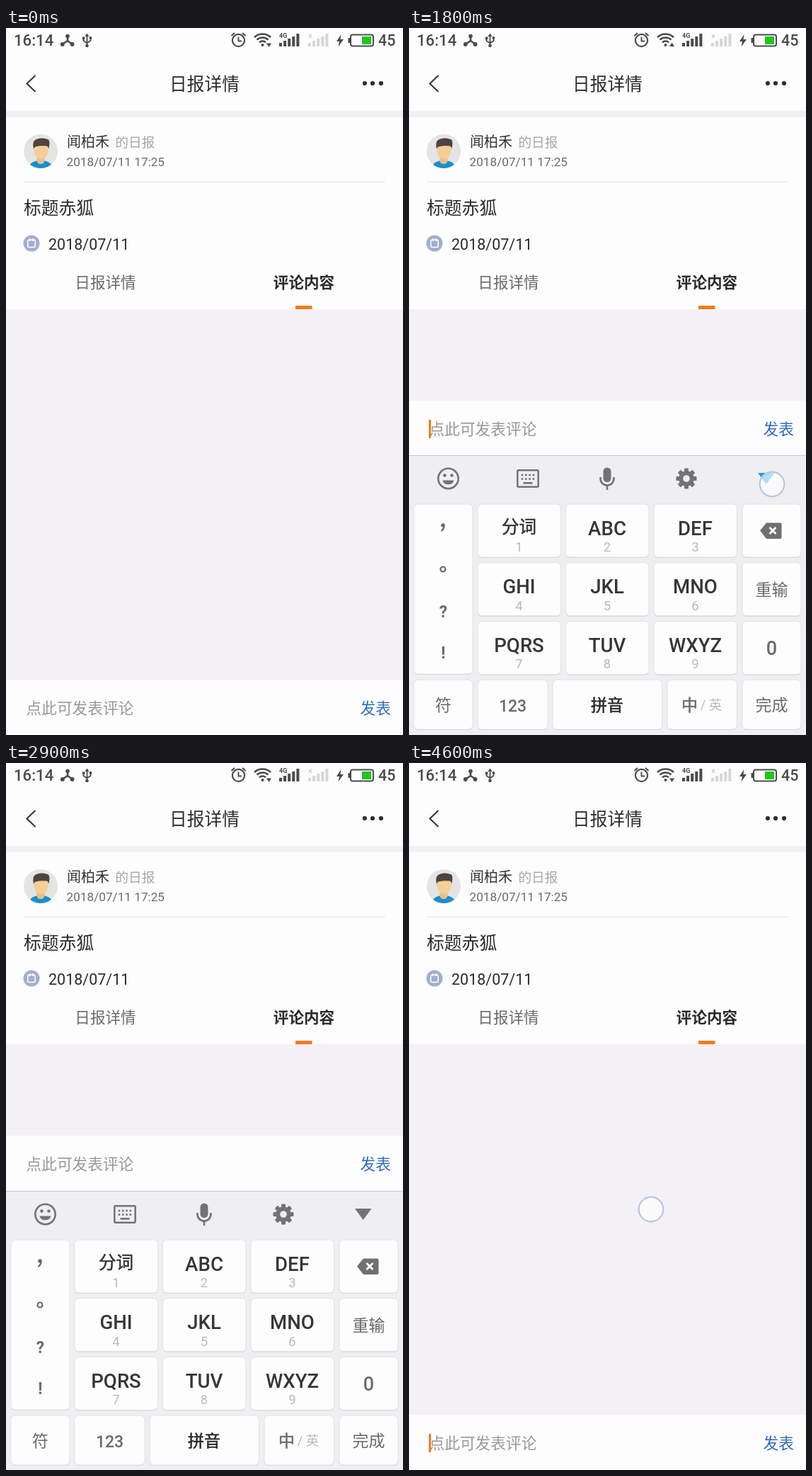
An HTML page that plays this animation: 561 by 998 pixels, repeating every 4700 ms.

```html
<!DOCTYPE html>
<html lang="zh-CN">
<head>
<meta charset="utf-8">
<style>
html, body { margin: 0; width: 100%; height: 100%; overflow: hidden; background: #fefdfe; }
svg { display: block; width: 561px; height: 998px; }
text { font-family: Roboto, "Noto Sans CJK SC", "Noto Sans CJK", sans-serif; white-space: pre; }
.medium { stroke: currentColor; stroke-width: .6px; }
</style>
</head>
<body>
<svg id="stage" viewBox="0 0 561 998" xmlns="http://www.w3.org/2000/svg"></svg>
<script>
const LOOP = 4700, STEP = 100, TRAVEL = 394;
const INK = '#2b2b2b', GREY = '#6a6a6c', PALE = '#b9b9bc', ORANGE = '#ee7c1c', WHITE = '#fefdfe';

const text = (x, y, size, fill, str, anchor = 'start', weight = 400) =>
  `<text x="${x}" y="${y}" font-size="${size}" fill="${fill}" text-anchor="${anchor}" font-weight="${weight}">${str}</text>`;
const mid = (x, y, size, fill, str, weight) => text(x, y, size, fill, str, 'middle', weight);
// Han glyphs have no medium weight here, so thicken the regular one
const medium = (x, y, size, fill, str) =>
  `<g class="medium" color="${fill}">${mid(x, y, size, fill, str)}</g>`;
const rect = (x, y, w, h, fill, extra = '') =>
  `<rect x="${x}" y="${y}" width="${w}" height="${h}" fill="${fill}" ${extra}/>`;
const dot = (x, y, r, fill, extra = '') => `<circle cx="${x}" cy="${y}" r="${r}" fill="${fill}" ${extra}/>`;
const line = (d, stroke, w, extra = '') =>
  `<path d="${d}" fill="none" stroke="${stroke}" stroke-width="${w}" ${extra}/>`;
const fill = (d, color, extra = '') => `<path d="${d}" fill="${color}" ${extra}/>`;

const bars = (x, color) => [5, 8, 11, 14, 18]
  .map((h, i) => rect(x + i * 6.1, 26 - h, 4, h, color)).join('');

function statusBar() {
  const c = '#4a4a4c';
  const wave = r => line(`M${362.5 - r * .7} ${25 - r * .72}A${r} ${r} 0 0 1 ${362.5 + r * .7} ${25 - r * .72}`, c, 2.5);
  return text(11, 25, 22.2, c, '16:14', 'start', 500)
    + line('M87 11V18L79.5 23M87 18L94 23', c, 2.6)
    + dot(87, 11.5, 2.8, c) + dot(79.8, 23, 2.9, c) + dot(93.6, 23, 2.9, c)
    + line('M114.5 10V25M109.5 14V18L114.5 21.5L119.5 18V14', c, 1.8)
    + fill('M111.5 12L114.5 7.5L117.5 12Z', c) + dot(114.5, 25, 2.3, c)
    + rect(107.8, 12.5, 3.6, 3.6, c) + dot(119.5, 14, 2, c)
    + dot(328.5, 17.5, 8.6, 'none', `stroke="${c}" stroke-width="2.2"`)
    + line('M328.5 12.5V18.5H333', c, 1.9) + line('M318.5 11L323 7M334 7L338.5 11', c, 2.2)
    + wave(16.5) + wave(11.5) + wave(6.5) + dot(362.5, 24, 2, c)
    + `<g id="traffic"></g>`
    + bars(386, c) + rect(385, 7, 13, 8, WHITE) + text(386, 14, 9, c, '4G', 'start', 700)
    + bars(427, '#d6d6d8') + line('M428 9L432 14M432 9L428 14', '#bdbdc0', 1.1)
    + fill('M473.5 9L467 19H471L469.5 26.5L477 16H472.5Z', c)
    + rect(487, 9.5, 32, 16, 'none', `rx="3" stroke="${c}" stroke-width="2"`)
    + rect(483.5, 14, 3, 7, c) + rect(503, 12, 13, 11, '#1fc71f')
    + text(526, 25, 21.5, c, '45', 'start', 500);
}

function avatar() {
  return `<clipPath id="face"><circle cx="49" cy="174" r="24"/></clipPath><g clip-path="url(#face)">`
    + rect(25, 150, 48, 48, '#e4e4e6')
    + fill('M32 199Q32 190 43 187.5H55Q66 190 66 199Z', '#1b8ecb')
    + fill('M43.5 178H54.5V187Q54 192 49 192Q44 192 43.5 187Z', '#e9c086')
    + fill('M39.5 164H59.5V174Q58 184 49.5 185Q41 184 39.5 174Z', '#f2cf95')
    + fill('M39 171Q36.5 160 42 157.5Q50 153.5 60 157.5Q63 162 60 171Q60 167 57.5 166.5Q49 165.5 42 167.5Q39.5 168 39 171Z', '#50423d')
    + '</g>';
}

function page() {
  return rect(0, 0, 561, 998, WHITE) + statusBar()
    + line('M41.5 67L29.5 78.5L41.5 90', '#333', 2)
    + mid(280.5, 88, 24.7, INK, '日报详情')
    + [507, 518, 530].map(x => dot(x, 78, 3.1, '#2d2d2d')).join('')
    + rect(0, 117, 561, 9, '#f1f0f3')
    + avatar()
    + text(86, 168, 20, '#333', '闻柏禾') + text(154.5, 168, 18.6, '#a6a6a8', '的日报')
    + text(85.5, 195, 17.2, GREY, '2018/07/11 17:25')
    + rect(25, 216.5, 511, 1.5, '#ebebed')
    + text(25, 263, 24.8, INK, '标题赤狐')
    + dot(36, 304, 11.5, '#a0b0cc')
    + rect(30.8, 299, 10.4, 10.4, 'none', 'rx="2" stroke="#fff" stroke-width="1.5"')
    + line('M33.800 297V301M38.200 297V301', '#fff', 1.5)
    + text(60, 313, 21.5, INK, '2018/07/11')
    + mid(140.5, 366.5, 21.6, GREY, '日报详情')
    + mid(421, 366.5, 21.6, INK, '评论内容', 700)
    + rect(409, 392, 23.5, 5, ORANGE)
    + rect(0, 397, 561, 601, '#f3f1f5');
}

function commentBar() {
  return rect(0, 920, 561, 78, WHITE) + rect(0, 998, 561, 394, '#f8f8fa')
    + text(28.5, 967.5, 21.7, '#98989a', '点此可发表评论')
    + text(500.5, 967.5, 21.7, '#2f69c2', '发表')
    + `<g id="caret">${rect(28, 947, 3, 26, ORANGE)}</g>`;
}

const key = (x, y, w, h) => rect(x, y + 1, w, h, '#d3d2d6', 'rx="6"')
  + rect(x, y, w, h, WHITE, 'rx="6" stroke="#e2e1e5" stroke-width="1"');

function toolIcons() {
  const c = '#737375';
  const teeth = [...Array(8).keys()]
    .map(i => rect(389, 621.5, 6, 8, c, `rx="1" transform="rotate(${i * 45} 392 636)"`)).join('');
  const pads = [631, 636.5].map(y => [160, 165.3, 170.6, 175.9]
    .map(x => rect(x - 1.3, y - 1.3, 2.6, 2.6, c)).join('')).join('');
  return dot(55.5, 636, 14.2, 'none', `stroke="${c}" stroke-width="2.6"`)
    + dot(50.5, 631.5, 2.3, c) + dot(60.5, 631.5, 2.3, c)
    + fill('M47.5 638.5H63.5A8.2 7.5 0 0 1 47.5 638.5Z', c)
    + rect(153.3, 624.3, 29.4, 23.4, 'none', `rx="1.5" stroke="${c}" stroke-width="2.5"`)
    + pads + rect(161.5, 641, 13, 2.6, c)
    + rect(274.5, 620.5, 11, 20.5, c, 'rx="5.5"')
    + line('M270.5 634V636A9.5 9.5 0 0 0 289.5 636V634M280 645.5V652', c, 2.6)
    + teeth + dot(392, 636, 7.8, 'none', `stroke="${c}" stroke-width="6"`)
    + `<path id="fold" d="M493 628H516.5L504.700 644Z"/>`;
}

function keyboard() {
  const letters = ['分词', 'ABC', 'DEF', 'GHI', 'JKL', 'MNO', 'PQRS', 'TUV', 'WXYZ'];
  const cols = [97, 221.5, 346], rows = [0, 1, 2].map(i => 672 + i * 82.7);
  const pad = letters.map((s, i) => {
    const x = cols[i % 3], y = rows[Math.floor(i / 3)], cx = x + 58.5;
    return key(x, y, 117.5, 75)
      + (i ? mid(cx, y + 43.5, 27.6, '#363638', s, 500) : medium(cx, y + 41, 24.5, '#363638', s))
      + mid(cx, y + 67, 18.5, PALE, i + 1);
  }).join('');
  const foot = [[7, 83], [97, 99], [203, 154.5], [365, 98.5], [471, 83]]
    .map(([x, w]) => key(x, 920, w, 70)).join('');
  return rect(0, 603, 561, 395, '#efeef1') + rect(0, 603, 561, 1, '#c9c8cc')
    + toolIcons() + key(7, 672, 83, 240) + pad
    + rows.map(y => key(471, y, 83, 75)).join('') + foot
    + dot(48, 702, 2.8, GREY) + line('M49.5 702Q50 707 45.5 710', GREY, 2.2)
    + dot(48, 764, 3.5, 'none', `stroke="${GREY}" stroke-width="2.2"`)
    + mid(48.5, 832, 23, GREY, '?', 700) + mid(48.5, 890, 23, GREY, '!', 700)
    + fill('M496 709.5L505 698.5H524.5Q526.5 698.5 526.5 700.5V719Q526.5 721 524.5 721H505Z', '#707072')
    + line('M509.5 705L518.5 714M518.5 705L509.5 714', '#fff', 2.8)
    + mid(512.5, 801, 23, GREY, '重输') + mid(512.5, 885, 27, GREY, '0', 500)
    + mid(48.5, 964, 23, GREY, '符') + mid(146.5, 964.5, 23, GREY, '123', 500)
    + medium(280, 964, 23, INK, '拼音')
    + medium(396.5, 964, 23, GREY, '中') + mid(415.5, 962, 18, PALE, '/')
    + mid(433, 962, 18, PALE, '英') + mid(512.5, 964, 23, GREY, '完成');
}

const stage = document.getElementById('stage');
stage.innerHTML = page() + `<g id="bar">${commentBar()}</g><g id="keys">${keyboard()}</g>`
  + dot(0, 0, 17.3, '#fff', 'id="touch" stroke="#b9c6de" stroke-width="2.2"');
const el = id => document.getElementById(id);
const bar = el('bar'), keys = el('keys'), caret = el('caret'), touch = el('touch'),
  fold = el('fold'), traffic = el('traffic');

const inside = (t, spans) => spans.find(([a, b]) => t >= a && t < b);

// each session: rise start, drop start
const SESSIONS = [[776, 2105], [2509, 3281]];
const RISE = 430, DROP = 300;
const CARET = [[300, 800], [1300, 1900], [2400, 2900], [3400, 3900], [4400, 4700]];
// start, end, x, y, opacity
const TOUCHES = [
  [700, 900, 162, 966, .6], [1700, 2000, 513, 644, .65], [2400, 2600, 162, 966, .6],
  [3200, 3300, 513, 644, .65], [4600, 4700, 342, 630, .75]
];
const ARROWS = { down: 'M368 21.5H375L371.5 27Z', up: 'M368 26H375L371.5 20.5Z' };

const left = p => Math.pow(Math.max(0, 1 - p), 2.5);

function keyboardOffset(t) {
  for (const [rise, drop] of SESSIONS) {
    if (t >= rise && t < drop) return Math.ceil(TRAVEL * left((t - rise) / RISE));
    if (t >= drop && t < drop + DROP) return Math.round(TRAVEL * (1 - left((t - drop) / DROP)));
  }
  return TRAVEL + 2;
}

function draw(now) {
  const t = Math.floor(now % LOOP / STEP) * STEP;
  bar.setAttribute('transform', `translate(0 ${inside(t, SESSIONS) ? -TRAVEL : 0})`);
  keys.setAttribute('transform', `translate(0 ${keyboardOffset(t)})`);
  caret.style.display = inside(t, CARET) ? '' : 'none';

  const tap = inside(t, TOUCHES);
  touch.style.display = tap ? '' : 'none';
  if (tap) {
    touch.setAttribute('cx', tap[2]);
    touch.setAttribute('cy', tap[3]);
    touch.setAttribute('fill-opacity', tap[4]);
  }
  fold.setAttribute('fill', tap && tap[2] > 500 ? '#1f9fec' : '#737375');

  const arrow = t >= 1200 && t < 2200 ? 'up' : t >= 3200 && t < 4200 ? '' : 'down';
  traffic.innerHTML = arrow
    ? fill(ARROWS[arrow], '#4a4a4c', `stroke="${WHITE}" stroke-width="2" paint-order="stroke"`) : '';
}

const start = performance.now();
function tick() {
  draw(performance.now() - start);
  requestAnimationFrame(tick);
}
tick();
</script>
</body>
</html>
```
